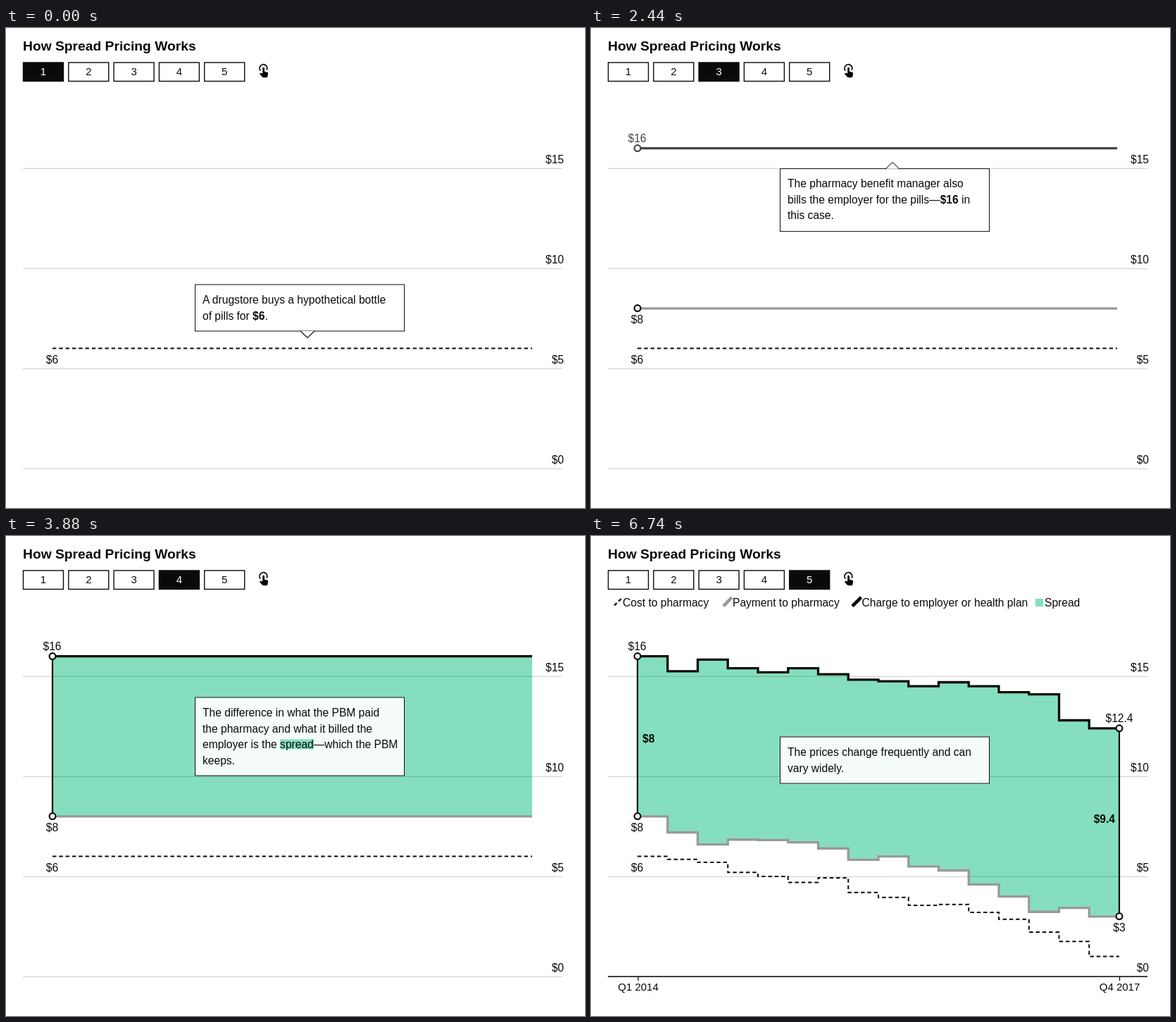
Animation, 822 px wide and 681 px high, one loop 6.76 s. Source, as an HTML page:

```html
<!DOCTYPE html>
<html lang="en">
<head>
<meta charset="utf-8">
<title>How Spread Pricing Works</title>
<style>
  html, body { margin: 0; width: 100%; height: 100%; overflow: hidden; background: #fff; }
  body { position: relative; font: 15.6px "Liberation Sans", Arial, sans-serif; color: #0a0a0a; }
  svg { position: absolute; left: 0; top: 0; width: 822px; height: 681px; }
  text { fill: #0a0a0a; }
  .mid { text-anchor: middle; }
  .end { text-anchor: end; }
  .bold { font-weight: bold; }
  .line { fill: none; stroke-width: 3.3; }
  .dot { fill: #fff; stroke: #0a0a0a; stroke-width: 2.2; }
  .axis { stroke: #0a0a0a; stroke-width: 1.3; }
  #tip {
    position: absolute; left: 268px; top: 0; width: 298px; box-sizing: border-box;
    padding: 10px; border: 1.4px solid #0a0a0a; background: rgba(255, 255, 255, .92);
    line-height: 22.5px; white-space: nowrap;
  }
  #tip mark {
    color: inherit;
    background: linear-gradient(#85dfbe, #85dfbe) 0 50% / 100% 14px no-repeat;
  }
</style>
</head>
<body>
<svg viewBox="0 0 822 681">
  <defs><clipPath id="wipe"><rect id="window" x="60" y="100" height="540"/></clipPath></defs>

  <text class="bold" x="24" y="32" font-size="19.25">How Spread Pricing Works</text>
  <g id="buttons"></g>
  <g id="hand">
    <path d="M361.2 60.6A5.4 5.4 0 1 1 370.2 59.6" fill="none" stroke="#0a0a0a" stroke-width="1.8"/>
    <path d="M364.2 57.2q0-1.5 1.4-1.5t1.4 1.5v4.6l4 .9q1.3.4 1.1 1.8l-.7 4.2q-.3 1.6-1.8 1.6h-4q-1 0-1.7-.8l-4-4.4 1-1q.5-.4 1.2-.2l2.1.6z"/>
  </g>

  <g id="legend">
    <path d="M33 98.5L45.5 86.5" stroke="#0a0a0a" stroke-width="2.4" stroke-dasharray="5 3.6"/>
    <path d="M188 99.5L200 87" stroke="#999" stroke-width="4.6"/>
    <path d="M371 99.5L383.500 87" stroke="#0a0a0a" stroke-width="4.6"/>
    <rect x="631" y="89" width="11" height="11" fill="#85dfbe"/>
    <text x="45" y="100">Cost to pharmacy</text>
    <text x="201" y="100">Payment to pharmacy</text>
    <text x="384.500" y="100">Charge to employer or health plan</text>
    <text x="644" y="100">Spread</text>
  </g>

  <path id="area" fill="#85dfbe" clip-path="url(#wipe)"/>
  <g id="grid"></g>
  <g id="axis">
    <path class="axis" d="M24 625H790M67 625v6M750.500 625v6"/>
    <text class="mid" x="67" y="645" font-size="15">Q1 2014</text>
    <text class="mid" x="750.500" y="645" font-size="15">Q4 2017</text>
  </g>

  <path id="cost" clip-path="url(#wipe)" fill="none" stroke="#0a0a0a" stroke-width="2" stroke-dasharray="5.4 3.900"/>
  <text class="mid" x="65.500" y="476">$6</text>
  <path id="gap" d="M66 170.600V397.800" stroke="#0a0a0a" stroke-width="2.2"/>
  <path id="endGap" d="M750 272.800V539.800" stroke="#0a0a0a" stroke-width="2.2"/>
  <g id="paid">
    <path id="paidLine" class="line" stroke="#999" clip-path="url(#wipe)"/>
    <circle class="dot" cx="66" cy="397.600" r="4.4"/>
    <text class="mid" x="65.500" y="419">$8</text>
  </g>
  <g id="billed">
    <path id="billedLine" class="line" stroke="#0a0a0a" clip-path="url(#wipe)"/>
    <circle class="dot" cx="66" cy="170.600" r="4.400"/>
    <text class="mid" x="65.500" y="161.500">$16</text>
  </g>
  <g id="results">
    <circle class="dot" cx="750" cy="272.800" r="4.400"/>
    <circle class="dot" cx="750" cy="539.600" r="4.400"/>
    <text class="mid" x="750" y="263.500">$12.4</text>
    <text class="mid" x="750" y="561">$3</text>
    <text class="bold" x="73" y="292.500">$8</text>
    <text class="bold end" x="744" y="406.500">$9.4</text>
  </g>
</svg>
<div id="tip"></div>
<svg viewBox="0 0 822 681">
  <path id="pointer" d="M-10 -1L0 8.500L10 -1" fill="#fff" stroke="#0a0a0a" stroke-width="1.100"/>
</svg>

<script>
const LOOP = 6760, MOVE = 1000;
const GROW = 5350, GROW_TIME = 1370;
const LEFT = 66, RIGHT = 750, FLAT_END = 747, QUARTER = (RIGHT - LEFT) / 16;

const billed = [16, 15.25, 15.83, 15.4, 15.2, 15.4, 15.1, 14.83, 14.75, 14.5, 14.7, 14.5, 14.2, 14.1, 12.8, 12.4];
const paid = [8, 7.2, 6.6, 6.84, 6.82, 6.7, 6.4, 5.83, 6, 5.5, 5.3, 4.6, 4, 3.23, 3.43, 3];
const cost = [6, 5.85, 5.7, 5.2, 5, 4.7, 4.93, 4.2, 3.95, 3.56, 3.6, 3.2, 2.86, 2.22, 1.75, 1];

// click: button and text switch; start: motion begins; from/to: box top
const steps = [
  { click: 0, start: -MOVE, from: 363.5, to: 363.5, ptr: [431, 431],
    text: ['A drugstore buys a hypothetical bottle', 'of pills for <b>$6</b>.'] },
  { click: 660, start: 646, from: 363.5, to: 219, ptr: [431, 377],
    text: ['When someone uses employer-', 'provided insurance to fill a prescription,',
      'their pharmacy benefit manager (PBM)', 'pays the pharmacy to cover the cost—',
      '<b>$8</b> for the pills in this example, allowing', 'the pharmacy to pocket <b>$2</b>.'] },
  { click: 1820, start: 1830, from: 219, to: 193, ptr: [219, 193], up: true,
    text: ['The pharmacy benefit manager also', 'bills the employer for the pills—<b>$16</b> in', 'this case.'] },
  { click: 2870, start: 2874, from: 193, to: 228.5,
    text: ['The difference in what the PBM paid', 'the pharmacy and what it billed the',
      'employer is the <mark>spread</mark>—which the PBM', 'keeps.'] },
  { click: 3980, start: 3990, from: 228.5, to: 284.5,
    text: ['The prices change frequently and can', 'vary widely.'] }
];

const el = id => document.getElementById(id);
const mix = (a, b, k) => a + (b - a) * k;
const yOf = price => 625 - price * 28.4;

function ease(t, start, span = MOVE) {
  const k = Math.min(1, Math.max(0, (t - start) / span));
  return k < .5 ? 4 * k ** 3 : 1 - 4 * (1 - k) ** 3;
}

function corners(prices) {
  return prices.flatMap((p, i) => [[LEFT + i * QUARTER, yOf(p)], [LEFT + (i + 1) * QUARTER, yOf(p)]]);
}
const flat = price => [[LEFT, yOf(price)], [FLAT_END, yOf(price)]];
const toPath = pts => 'M' + pts.map(p => p.map(v => v.toFixed(2)).join(' ')).join('L');

function shapes(top, low, base) {
  return {
    billedLine: toPath(top),
    paidLine: toPath(low),
    cost: toPath(base),
    area: toPath([...top, ...[...low].reverse()]) + 'Z'
  };
}
const flatShapes = shapes(flat(16), flat(8), flat(6));
const stepShapes = shapes(corners(billed), corners(paid), corners(cost));

el('buttons').innerHTML = steps.map((s, i) => {
  const x = 24.5 + 64.3 * i;
  return `<rect x="${x}" y="49" width="57" height="26.5" stroke="#0a0a0a" stroke-width="1.4"/>
    <text class="mid" x="${x + 28.5}" y="67" font-size="15">${i + 1}</text>`;
}).join('');
const rects = [...el('buttons').querySelectorAll('rect')];
const digits = [...el('buttons').querySelectorAll('text')];

el('grid').innerHTML = [0, 5, 10, 15].map(p =>
  `<path d="M24 ${yOf(p) + .3}H790" stroke="#000" stroke-opacity=".21" stroke-width="1.1"/>
   <text class="end" x="792" y="${yOf(p) - 7}">$${p}</text>`).join('');

let shownStep = -1, shownShapes = null;

function showStep(n) {
  if (n === shownStep) return;
  shownStep = n;
  rects.forEach((r, i) => r.setAttribute('fill', i === n ? '#0a0a0a' : '#fff'));
  digits.forEach((d, i) => { d.style.fill = i === n ? '#fff' : '#0a0a0a'; });
  el('tip').innerHTML = steps[n].text.join('<br>');
}

function showShapes(set) {
  if (set === shownShapes) return;
  shownShapes = set;
  for (const id in set) el(id).setAttribute('d', set[id]);
}

const fade = (id, k) => { el(id).style.opacity = k; };

function draw(t) {
  const n = steps.findLastIndex(s => t >= s.click);
  const step = steps[n];
  const k = ease(t, step.start);
  const on = i => n < i ? 0 : ease(t, steps[i].start);

  showStep(n);
  el('tip').style.transform = `translateY(${mix(step.from, step.to, k)}px)`;

  fade('pointer', step.ptr ? k : 0);
  if (step.ptr) {
    const y = mix(...step.ptr, k);
    el('pointer').setAttribute('transform', `translate(428 ${y})${step.up ? ' scale(1 -1)' : ''}`);
  }

  fade('paid', on(1));
  fade('billed', on(2));
  fade('area', on(3));
  fade('gap', on(3));

  const late = ease(t, steps[4].start, 550);
  fade('legend', late);
  fade('axis', late);

  // the flat bands retreat to the first quarter, then the real prices unroll
  const growing = t >= GROW;
  const first = LEFT + QUARTER;
  const edge = growing
    ? mix(first, RIGHT, ease(t, GROW, GROW_TIME))
    : mix(FLAT_END, first, on(4));
  showShapes(growing ? stepShapes : flatShapes);
  el('window').setAttribute('width', edge - 60);

  const done = ease(t, 6400, 300);
  fade('results', done);
  fade('endGap', done);
}

const begin = performance.now();
function tick() {
  draw((performance.now() - begin) % LOOP);
  requestAnimationFrame(tick);
}
tick();
</script>
</body>
</html>
```
